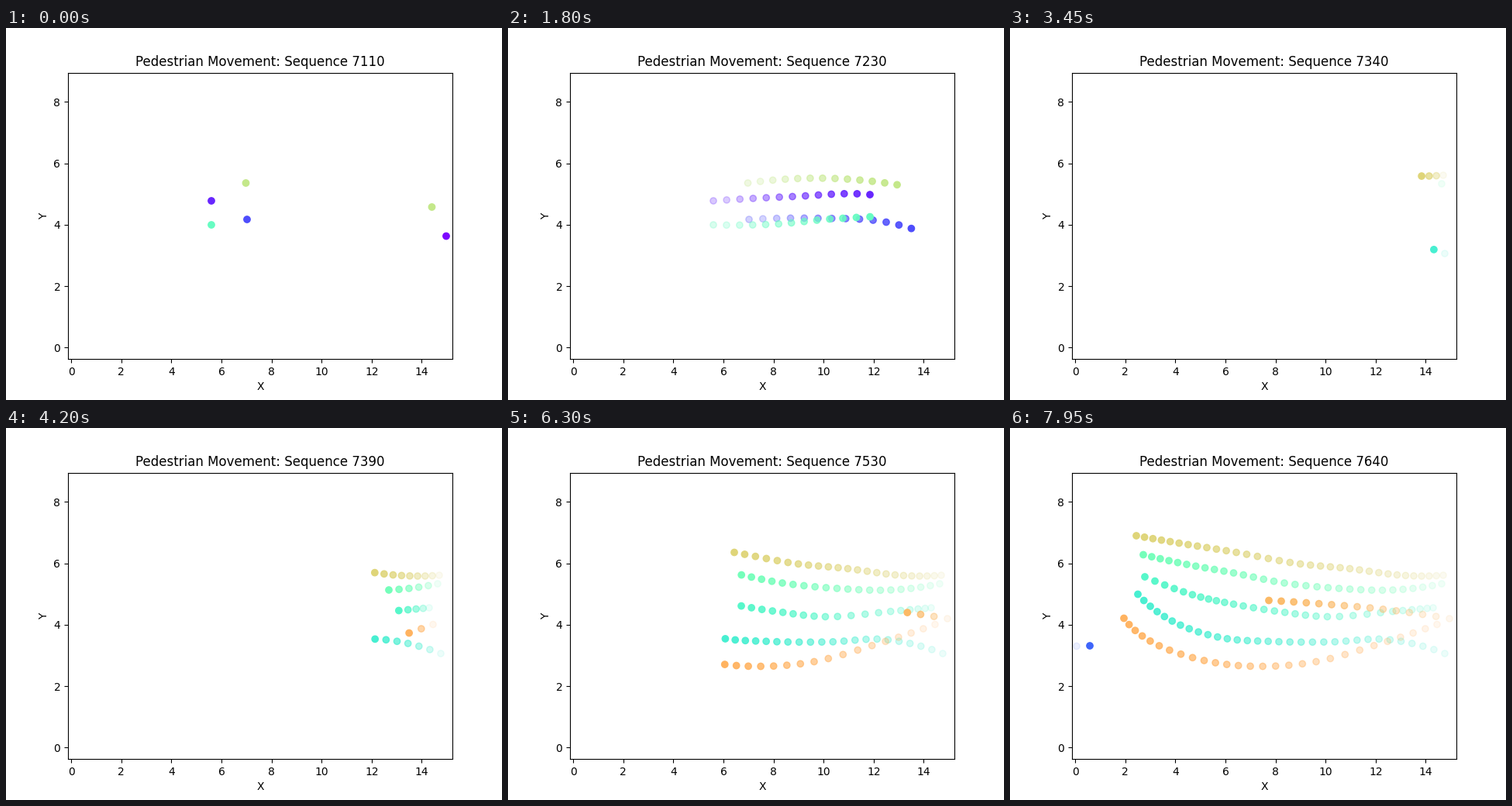
Recreate the animation shown at these times as a matplotlib script. Size 640 px wide and 480 px high, loop 8 s.

```python
import numpy as np
import matplotlib.pyplot as plt
from matplotlib.animation import FuncAnimation

TICK_MS = 50
TICKS_PER_STEP = 3
TICKS = 160
LAST_STEP = (TICKS - 1) // TICKS_PER_STEP
FIRST_SEQUENCE = 7110

X_LIM = (-0.1313, 15.2277)
Y_LIM = (-0.3768, 8.9562)
RAINBOW = plt.get_cmap("rainbow")

walkers = []


def to_data(pixels):
    """Convert stage pixels (y down) to axes data units."""
    x, y = pixels.T
    return np.column_stack([np.interp(x, [80, 576], X_LIM),
                            np.interp(y, [57.6, 427.2], Y_LIM[::-1])])


def smooth(keys, count):
    """Sample a cubic Hermite curve through key points evenly spaced in time."""
    keys = np.array(keys, float)
    slope = np.gradient(keys, axis=0, edge_order=min(2, len(keys) - 1))
    u = np.linspace(0, len(keys) - 1, count)
    i = np.minimum(u.astype(int), len(keys) - 2)
    t = (u - i)[:, None]
    ease = t * t * (3 - 2 * t)
    return (keys[i] * (1 - ease) + keys[i + 1] * ease
            + slope[i] * t * (1 - t) ** 2 - slope[i + 1] * t * t * (1 - t))


def walk(hue, start, last, *keys):
    path = to_data(smooth(keys, last - start + 1))
    if start == 0:  # the opening position is recorded twice
        path = np.vstack([path[:1], path])
    walkers.append((RAINBOW(hue), start, last, path))


# Walking right
walk(0.05, 0, 18, (265, 223), (367, 217.5), (467, 215), (566, 238))
walk(0.10, 0, 15, (311, 247), (400, 245.5), (488, 250.5), (566, 277.5))
walk(0.45, 0, 19, (265, 254), (345, 253), (423.5, 246), (505, 245), (573, 267))
walk(0.635, 0, 16, (309.5, 200), (438, 195), (566, 216))
walk(0.01, 0, 0, (568, 268.5), (585, 272))
walk(0.635, 0, 0, (549.5, 231), (566, 234))

# Walking left
walk(0.685, 20, LAST_STEP, (559, 190), (505, 190), (438.5, 181.5),
     (368, 174.5), (292, 160.5), (224, 149.5), (163, 139))
walk(0.39, 22, LAST_STEP, (561, 291), (488, 273), (414.5, 276),
     (340, 275.5), (272, 270.5), (211, 250), (165, 214.5))
walk(0.48, 23, LAST_STEP, (557, 201), (494, 209), (424.5, 207),
     (354, 200), (288.5, 187), (228, 176), (172, 163.5))
walk(0.42, 24, LAST_STEP, (546, 232), (496, 236.5), (414.5, 243.5),
     (348, 237), (284.5, 226.5), (233.5, 214.5), (174, 192))
walk(0.75, 26, LAST_STEP, (551, 253.5), (478.5, 278), (395, 301.5),
     (318, 307.5), (250.5, 300), (186.5, 278), (147, 245.5))
walk(0.74, 39, LAST_STEP, (567, 246), (487, 234.5), (409.5, 227.5),
     (334, 222.5))

# Entering from the left
walk(0.13, LAST_STEP - 1, LAST_STEP, (86, 281.5), (103, 281))

fig, ax = plt.subplots(figsize=(6.4, 4.8), dpi=100)
dots = ax.scatter([], [])
title = ax.set_title("")
ax.set(xlim=X_LIM, ylim=Y_LIM, xlabel="X", ylabel="Y")


def update(tick):
    step = tick // TICKS_PER_STEP
    points, colors = [np.empty((0, 2))], [np.empty((0, 4))]
    for color, start, last, path in walkers:
        if not start <= step <= last:
            continue
        count = len(path) - (last - step)
        rgba = np.tile(color, (count, 1))
        rgba[:, 3] = np.linspace(0.1, 1, count)
        points.append(path[:count])
        colors.append(rgba)
    dots.set_offsets(np.vstack(points))
    dots.set_facecolor(np.vstack(colors))
    dots.set_edgecolor(np.vstack(colors))
    title.set_text(f"Pedestrian Movement: Sequence {FIRST_SEQUENCE + 10 * step}")
    return dots, title


animation = FuncAnimation(fig, update, frames=TICKS, interval=TICK_MS,
                          repeat=True, repeat_delay=0)
plt.show()
```
